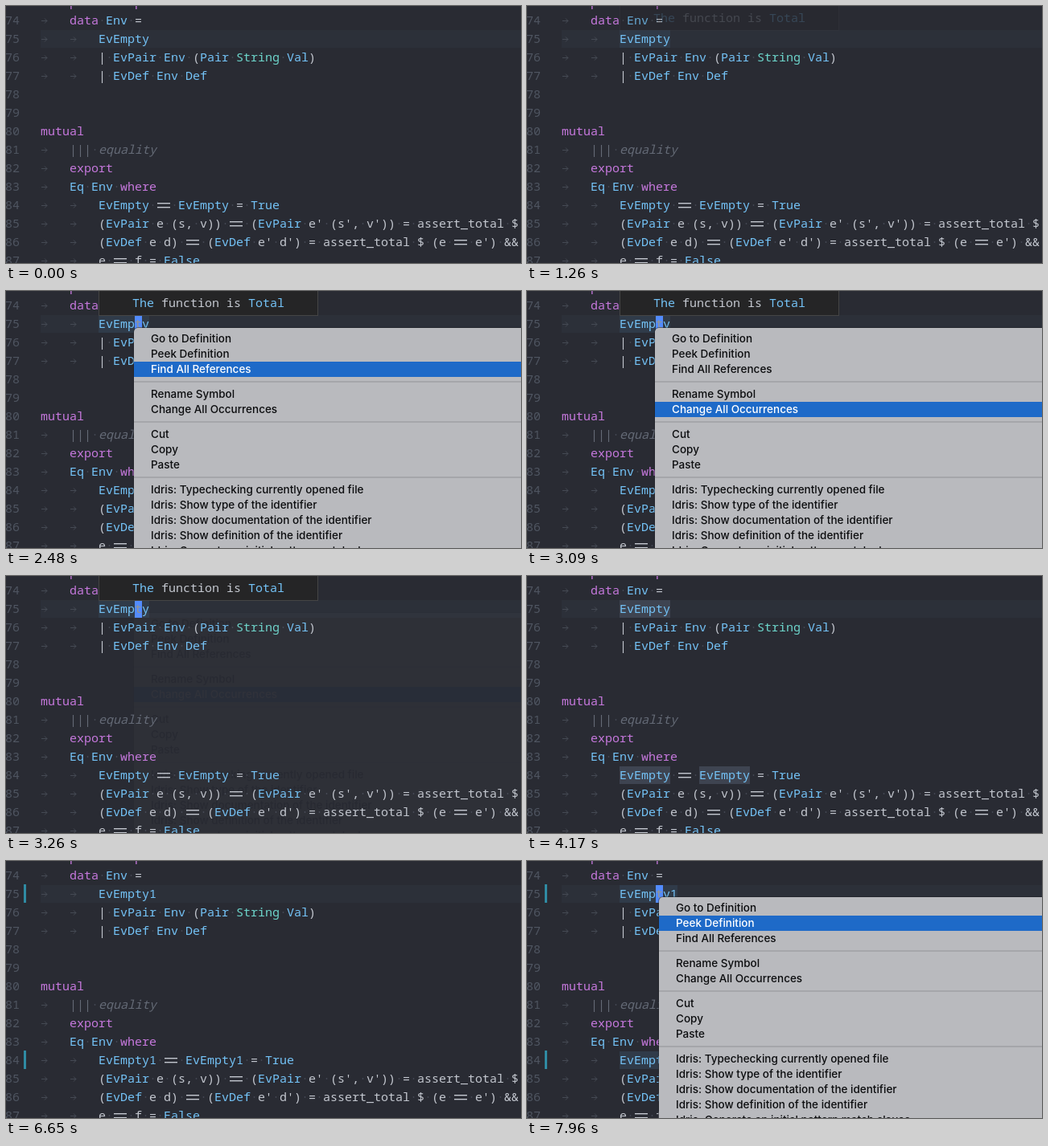
Recreate the animation shown at these times as an HTML page. Size 640 px wide and 320 px high, loop 8 s.

```html
<!DOCTYPE html>
<html lang="en">
<head>
<meta charset="utf-8">
<title>Rename all occurrences</title>
<style>
  html, body { margin: 0; width: 100%; height: 100%; overflow: hidden; background: #292b33; }
  svg { display: block; width: 640px; height: 320px; }
  text { white-space: pre; }
  .code { font: 500 15px "Noto Sans Mono", "DejaVu Sans Mono", monospace; }
  .italic { font-style: italic; }
  .menu { font: 500 13.5px Inter, "Liberation Sans", sans-serif; }
</style>
</head>
<body>
<svg id="stage" viewBox="0 0 640 320"></svg>
<script>
const LOOP = 8000, CELL = 9, LEFT = 43, PITCH = 23;
const COLOR = {
  plain: '#c3c7cf', type: '#74c3f7', basic: '#6dd5cb', keyword: '#c678dd',
  comment: '#646a76', number: '#4f5561', space: '#454a54',
  cursor: '#528bff', cursor2: '#4063ab', covered: '#96948c'
};
const stage = document.getElementById('stage');

function add(parent, tag, attrs = {}, content) {
  const node = document.createElementNS('http://www.w3.org/2000/svg', tag);
  for (const key in attrs) node.setAttribute(key, attrs[key]);
  if (content !== undefined) node.textContent = content;
  parent.append(node);
  return node;
}
const group = (parent = stage, attrs) => add(parent, 'g', attrs);
const box = (parent, x, y, width, height, fill, more) =>
  add(parent, 'rect', { x, y, width, height, fill, ...more });
const code = (parent, x, y, fill, content, style = '') =>
  add(parent, 'text', { class: `code ${style}`, x, y: y + 5, fill }, content);

const rowY = line => 18 + (line - 74) * PITCH;
const colX = col => LEFT + col * CELL;

function tokenColor(token) {
  if (/^(public|export|data|mutual|where)$/.test(token)) return COLOR.keyword;
  if (token === 'String') return COLOR.basic;
  return /^[A-Z]/.test(token) ? COLOR.type : COLOR.plain;
}

function drawTokens(parent, x, y, source) {
  const comment = source.startsWith('|||');
  for (const { 0: token, index } of source.matchAll(/==|\|\|\||&&|[A-Za-z_][\w']*|\s|\S/g)) {
    const at = x + index * CELL;
    if (token === ' ') {
      add(parent, 'circle', { cx: at + 4.5, cy: y, r: 0.9, fill: COLOR.space });
    } else if (token === '==') {
      for (const dy of [-3, 2]) box(parent, at + 1, y + dy, 16, 1.4, COLOR.plain);
    } else {
      const style = comment && token !== '|||' ? 'italic' : '';
      code(parent, at, y, comment ? COLOR.comment : tokenColor(token), token, style);
    }
  }
}

function drawRow(parent, line, tabs, source) {
  const y = rowY(line);
  code(parent, -1, y, COLOR.number, line);
  for (let i = 0; i < tabs; i++) {
    add(parent, 'path', {
      d: `M${colX(i * 4) + 1} ${y + 0.5}h7m-3 -3l3 3l-3 3`,
      fill: 'none', stroke: COLOR.space
    });
  }
  drawTokens(parent, colX(tabs * 4), y, source);
}

const marks = (spots, fill) => {
  const g = group();
  for (const [line, col, cells] of spots)
    box(g, colX(col), rowY(line) - 11, cells * CELL, 22, fill);
  return g;
};

// Editor
box(stage, 0, 0, 640, 320, '#292b33');
box(stage, LEFT, 30, 597, 22, '#2c3039');
const selection = marks([[75, 8, 7], [84, 8, 7], [84, 19, 7]], '#3e4451');
const hoverMark = marks([[75, 8, 7]], '#303b49');
const wordMarks = marks([[75, 8, 8], [84, 8, 8], [84, 20, 8]], '#303b49');

[
  [73, 1, 'public export'],
  [74, 1, 'data Env ='],
  [76, 2, '| EvPair Env (Pair String Val)'],
  [77, 2, '| EvDef Env Def'],
  [78, 0, ''],
  [79, 0, ''],
  [80, 0, 'mutual'],
  [81, 1, '||| equality'],
  [82, 1, 'export'],
  [83, 1, 'Eq Env where'],
  [85, 2, "(EvPair e (s, v)) == (EvPair e' (s', v')) = assert_total $ "],
  [86, 2, "(EvDef e d) == (EvDef e' d') = assert_total $ (e == e') && "],
  [87, 2, 'e == f = False']
].forEach(row => drawRow(stage, ...row));

const [before, after] = ['EvEmpty', 'EvEmpty1'].map(name => {
  const g = group();
  drawRow(g, 75, 2, name);
  drawRow(g, 84, 2, `${name} == ${name} = True`);
  return g;
});

const gutter = group();
for (const line of [75, 84]) box(gutter, 22, rowY(line) - 12, 3, 23, '#2f8ba3');

function blockCursor(parent, line, col, char, fill) {
  box(parent, colX(col), rowY(line) - 11, CELL, 22, fill);
  code(parent, colX(col), rowY(line), COLOR.covered, char);
}
const cursor = group();
blockCursor(cursor, 75, 13, 't', COLOR.cursor);
const cursors = group();
blockCursor(cursors, 75, 15, '1', COLOR.cursor);
blockCursor(cursors, 84, 15, '1', COLOR.cursor2);
blockCursor(cursors, 84, 27, '1', COLOR.cursor2);

// Hover card
const hover = group();
box(hover, 115.5, -10, 272, 40.5, '#252526', { stroke: '#454545' });
[[157, 'type', 'The'], [193, 'plain', 'function'], [274, 'plain', 'is'], [301, 'type', 'Total']]
  .forEach(([x, color, word]) => code(hover, x, 15, COLOR[color], word));

// Context menu, laid out from its top left corner
const menu = group();
box(menu, -1, -1, 520, 400, '#1b1d22', { rx: 6, opacity: 0.45 });
box(menu, 0, 0, 520, 400, '#b9babe', { rx: 5 });
const items = [];
let itemY = 13;
for (const label of [
  'Go to Definition', 'Peek Definition', 'Find All References', '',
  'Rename Symbol', 'Change All Occurrences', '',
  'Cut', 'Copy', 'Paste', '',
  'Idris: Typechecking currently opened file',
  'Idris: Show type of the identifier',
  'Idris: Show documentation of the identifier',
  'Idris: Show definition of the identifier',
  'Idris: Generate an initial pattern match clause'
]) {
  if (!label) {
    box(menu, 0, itemY - 4, 520, 2, '#a5a6aa');
    itemY += 12;
    continue;
  }
  const bar = box(menu, 0, itemY - 9, 520, 19, '#1e6ac8');
  const text = add(menu, 'text', { class: 'menu', x: 21, y: itemY + 5 }, label);
  items.push({ bar, text });
  itemY += 19;
}

// Pointer path through the menu: [start time, item index]
const picks = [
  [0, -1], [2180, 0], [2300, 1], [2420, 2], [2540, 3], [2660, 4],
  [3400, -1], [7740, 0], [7850, 1]
];

const show = (node, on) => node.setAttribute('visibility', on ? 'visible' : 'hidden');
const ramp = (t, from, to) => Math.min(1, Math.max(0, (t - from) / (to - from)));

function render(t) {
  const during = (from, to = LOOP) => t >= from && t < to;
  const second = t > 5000;

  show(before, t < 4520);
  show(after, t >= 4520);
  show(gutter, t >= 4720);
  show(selection, during(3340, 4300));
  show(hoverMark, during(1240, 3340));
  show(wordMarks, during(7600));
  show(cursor, during(1700, 3340) || during(7480));
  show(cursors, during(4600, 5480));
  hover.setAttribute('opacity', ramp(t, 1240, 1360) * (1 - ramp(t, 3420, 3540)));

  const fade = t < 3400 ? (1 - ramp(t, 3110, 3280)) ** 1.6 : 1;
  show(menu, during(1860, 3290) || during(7560));
  menu.setAttribute('opacity', fade);
  menu.setAttribute('transform', second ? 'translate(164 45)' : 'translate(159 46)');

  const picked = picks.filter(([start]) => start <= t).pop()[1];
  items.forEach(({ bar, text }, i) => {
    bar.setAttribute('opacity', i === picked ? 1 : 0);
    text.setAttribute('fill', i === picked ? '#fff' : '#0c0d0f');
  });
}

const began = performance.now();
function tick() {
  render((performance.now() - began) % LOOP);
  requestAnimationFrame(tick);
}
tick();
</script>
</body>
</html>
```
